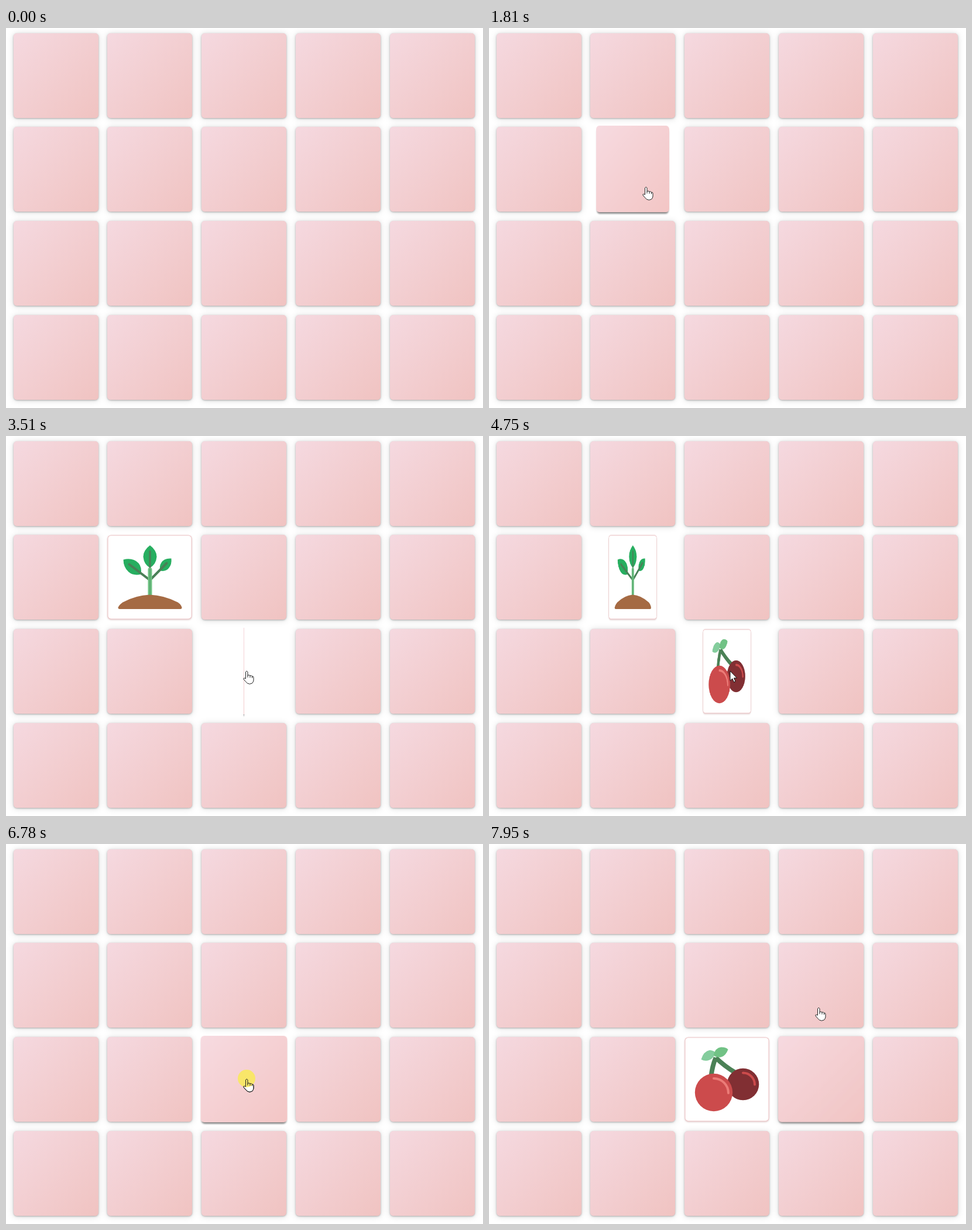
An HTML page with a canvas for the animation above (8 s loop, 815 by 650 pixels).

```html
<!DOCTYPE html>
<html lang="en">
<head>
<meta charset="utf-8">
<title>Memory cards</title>
<style>
html, body { margin: 0; width: 100%; height: 100%; overflow: hidden; background: #fff; }
canvas { display: block; }
</style>
</head>
<body>
<canvas id="stage" width="815" height="650"></canvas>
<script>
const ctx = document.getElementById('stage').getContext('2d');
const LOOP = 8000, STEP = 70, SIZE = 145, PAD = 20, TILE = SIZE + 2 * PAD;
const FLIP_TIME = 800, HOVER_TIME = 260;

// Moments at which bursts of motion begin; each burst advances in even steps.
const bursts = [0, 500, 1470, 1660, 2500, 3040, 3240, 4070, 4610, 5450, 6780, 7050, 7880];
const clicks = [[1470, 1660, 268, 271], [3040, 3240, 411, 401], [6780, 7050, 411, 401]];
const cursorPath = [
  [500, 290, 642], [640, 284, 540], [850, 274, 350], [1050, 268, 271], [2150, 268, 271],
  [2220, 272, 273], [2430, 396, 380], [2500, 411, 401], [7750, 411, 401],
  [7820, 491, 365], [7880, 520, 340], [7950, 563, 279]
];

const cards = [];
for (let row = 0; row < 4; row++) {
  for (let col = 0; col < 5; col++) {
    cards.push({
      x: Math.round(12.7 + 160.75 * col), y: Math.round(8.8 + 160.6 * row),
      flips: [], hovers: [], front: null
    });
  }
}
const plantCard = cards[6], cherryCard = cards[12];
plantCard.flips = [1682, 4586];
plantCard.hovers = [[900, 2230]];
cherryCard.flips = [3285, 4586, 7085];
cherryCard.hovers = [[2340, 3620], [5250, 7480]];
cards[16].hovers = [[500, 640]];
cards[11].hovers = [[670, 860]];
cards[13].hovers = [[7850, 7930]];

const clamp = v => Math.max(0, Math.min(1, v));

// cubic-bezier(.25, .1, .25, 1)
function ease(x) {
  if (x <= 0 || x >= 1) return clamp(x);
  let lo = 0, hi = 1;
  for (let i = 0; i < 20; i++) {
    const s = (lo + hi) / 2;
    if (.75 * s * (1 - s) + s * s * s < x) lo = s; else hi = s;
  }
  const s = lo, r = 1 - s;
  return .3 * s * r * r + 3 * r * s * s + s * s * s;
}

function makeTile(paint) {
  const tile = document.createElement('canvas');
  tile.width = tile.height = TILE;
  const c = tile.getContext('2d');
  c.translate(TILE / 2, TILE / 2);
  paint(c);
  return tile;
}

function box(c, size, radius) {
  c.beginPath();
  c.roundRect(-size / 2, -size / 2, size, size, radius);
}

function shadow(c, y, blur, color) {
  c.shadowOffsetY = y;
  c.shadowBlur = blur;
  c.shadowColor = color;
}

function paintBack(c, from, to, hovered) {
  const h = SIZE / 2;
  const fill = c.createLinearGradient(-h, -h, h, h);
  fill.addColorStop(0, from);
  fill.addColorStop(1, to);
  c.fillStyle = fill;
  if (hovered) {
    box(c, SIZE - 3, 5);
    shadow(c, 4, 3, 'rgba(0,0,0,.5)');
    c.fill();
  } else {
    box(c, SIZE, 6);
    shadow(c, 1, 11, 'rgba(0,0,0,.15)');
    c.fill();
    shadow(c, 1, 3, 'rgba(0,0,0,.28)');
    c.fill();
  }
  shadow(c, 0, 0, 'transparent');
  box(c, SIZE, 6);
  c.fill();
}

function paintFront(c, art) {
  box(c, SIZE - 1, 6);
  c.fillStyle = '#eec3c5';
  shadow(c, 1, 3, 'rgba(150,90,90,.35)');
  c.fill();
  shadow(c, 0, 0, 'transparent');
  box(c, SIZE - 3, 5);
  c.fillStyle = '#fff';
  c.fill();
  art(c);
}

function shape(c, path, color) {
  c.fillStyle = color;
  c.fill(new Path2D(path));
}

function line(c, path, color, width, cap = 'round') {
  c.strokeStyle = color;
  c.lineWidth = width;
  c.lineCap = cap;
  c.stroke(new Path2D(path));
}

function disc(c, x, y, r, color) {
  c.fillStyle = color;
  c.beginPath();
  c.arc(x, y, r, 0, 7);
  c.fill();
}

function paintPlant(c) {
  const leaf = '#27ae60', vein = '#4a8057';
  shape(c, 'M.5-54.5Q12-46 12-35Q11-22 .5-16Q-10-22-11-35Q-11-46 .5-54.5Z', leaf);
  shape(c, 'M-45-30Q-29-34-19-24Q-13-17-15-5Q-28-2-36-9Q-45-17-45-30Z', leaf);
  shape(c, 'M37-32Q25-33 20-25Q16-19 18-11Q28-9 33-16Q38-22 37-32Z', leaf);
  line(c, 'M.5-44V-17', vein, 3.5);
  line(c, 'M-35-22L.5 5L29-24', vein, 4);
  line(c, 'M.5-13V31', '#70c283', 7);
  line(c, 'M.5-14V30', '#58a96f', 2);
  shape(c, 'M-54 52Q-53 48-46 43Q-24 31 0 30Q25 31 48 43Q54 47 55 52Q55 54.5 52 54.5H-51Q-54 54.5-54 52Z', '#a56a43');
}

function paintCherries(c) {
  const red = '#cc4b4c', stem = '#4b8156';
  line(c, 'M-19-37Q-25-23-27-5', stem, 8, 'butt');
  line(c, 'M-19-37Q-5-23 15-11', stem, 8, 'butt');
  shape(c, 'M-44-34Q-40-48-29-50Q-22-49-20-46Q-22-36-30-33Q-37-30-44-34Z', '#84cd9d');
  shape(c, 'M-23-41Q-20-54-10-55Q-1-55 2-51Q-2-40-10-38Q-18-37-23-41Z', '#71c285');
  disc(c, 27.5, 8.5, 27.3, '#812f33');
  line(c, 'M27.5-11A20 20 0 0 1 47.5 9', red, 4);
  disc(c, -22.5, 22.5, 32.2, red);
  line(c, 'M-22.5-1.5A25 25 0 0 1 2.5 23.5', '#eb7c78', 4);
}

const backTile = makeTile(c => paintBack(c, '#f5d9e0', '#f0c3c1', false));
const hoverTile = makeTile(c => paintBack(c, '#f7dbe1', '#f3c6c5', true));
plantCard.front = makeTile(c => paintFront(c, paintPlant));
cherryCard.front = makeTile(c => paintFront(c, paintCherries));

// 0 is face down, 1 is face up
function turned(card, t) {
  return card.flips.reduce((sum, start, i) =>
    sum + (i % 2 ? -1 : 1) * ease((t - start) / FLIP_TIME), 0);
}

function hoverAmount(card, t) {
  return card.hovers.reduce((most, [on, off]) =>
    Math.max(most, ease((t - on) / HOVER_TIME) - ease((t - off) / HOVER_TIME)), 0);
}

function drawCard(card, t) {
  const cos = Math.cos(Math.PI * turned(card, t));
  const hover = hoverAmount(card, t);
  const put = tile => ctx.drawImage(tile, -TILE / 2, -TILE / 2);
  ctx.save();
  ctx.translate(card.x + SIZE / 2, card.y + SIZE / 2);
  ctx.scale(Math.max(Math.abs(cos), .012), 1);
  if (cos < -.01) {
    put(card.front);
  } else {
    const grow = 1 + .02 * hover;
    ctx.translate(0, -.5 * hover);
    ctx.scale(grow, grow);
    if (hover < 1) put(backTile);
    ctx.globalAlpha = hover;
    if (hover > 0) put(hoverTile);
  }
  ctx.restore();
}

const handShape = new Path2D('M-1.5 14V2.5Q0 -.5 2 2.5V8.5Q4 6.8 6 9Q8 7.8 9.5 10Q11.5 9.2 12 12V17Q11.5 20 9.5 22Q5 24.5 1.5 22Q-2 19-5 15Q-5.5 11.5-1.5 14Z');
const knuckles = new Path2D('M2 8V12M6 9V12.5M9.5 10V13');
const arrowShape = new Path2D('M1 1V17.5L4.8 14L7.5 20L10 19L7.5 13H12.5Z');

function outlineHand() {
  ctx.strokeStyle = '#222';
  ctx.lineWidth = 1;
  ctx.stroke(handShape);
  ctx.stroke(knuckles);
}

function drawCursor(t) {
  if (t < cursorPath[0][0]) return;
  let i = cursorPath.findIndex(key => key[0] > t);
  if (i < 0) i = cursorPath.length - 1;
  const [t0, x0, y0] = cursorPath[i - 1], [t1, x1, y1] = cursorPath[i];
  const k = clamp((t - t0) / (t1 - t0));
  const x = x0 + (x1 - x0) * k, y = y0 + (y1 - y0) * k;
  const over = cards.find(c => x >= c.x && x <= c.x + SIZE && y >= c.y && y <= c.y + SIZE);
  const hand = over && turned(over, t) < .51;
  const click = clicks.find(([on, off]) => t >= on && t < off);

  ctx.save();
  ctx.translate(x, y);
  ctx.lineJoin = 'round';
  ctx.fillStyle = '#fff';
  ctx.fill(hand ? handShape : arrowShape);
  if (hand) {
    outlineHand();
  } else {
    ctx.strokeStyle = '#111';
    ctx.lineWidth = 1;
    ctx.stroke(arrowShape);
  }
  ctx.restore();

  if (click) {
    disc(ctx, click[2], click[3], 15, 'rgba(249,231,96,.92)');
    ctx.save();
    ctx.translate(x, y);
    outlineHand();
    ctx.restore();
  }
}

function stepped(t) {
  const start = bursts.filter(b => b <= t).pop();
  return start + STEP * Math.floor((t - start + 10) / STEP);
}

function draw(time) {
  const t = stepped(time);
  ctx.fillStyle = '#fff';
  ctx.fillRect(0, 0, 815, 650);
  cards.forEach(card => drawCard(card, t));
  drawCursor(t);
}

let began = null;
function tick(now) {
  if (began === null) began = now;
  draw((now - began) % LOOP);
  requestAnimationFrame(tick);
}
draw(0);
requestAnimationFrame(tick);
</script>
</body>
</html>
```
